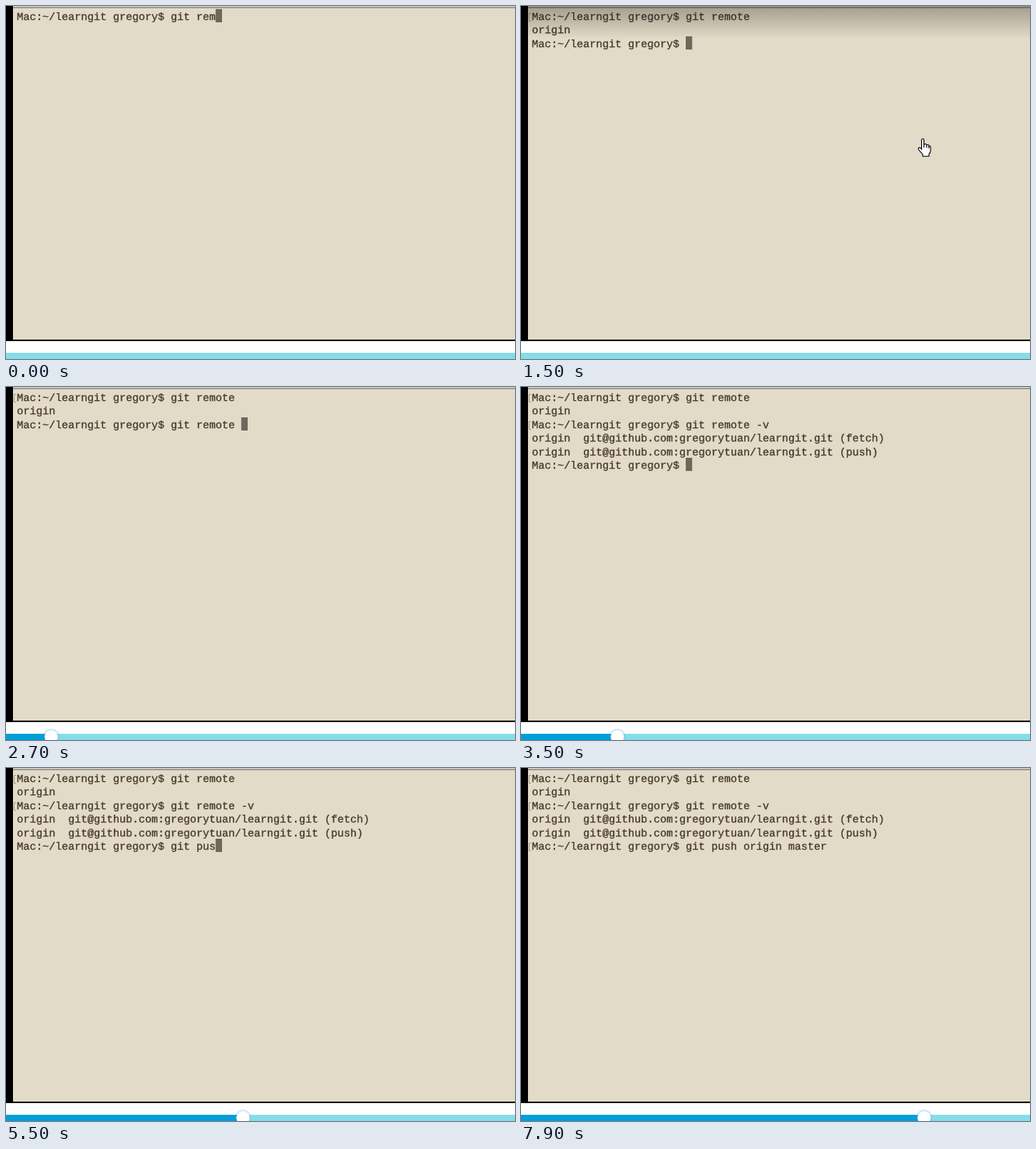
These frames come from a looping animation (655x454 px, 8000 ms). An HTML page with a canvas:

```html
<!DOCTYPE html>
<html lang="en">
<head>
<meta charset="utf-8">
<title>Terminal session</title>
<style>
html, body { margin: 0; width: 100%; height: 100%; overflow: hidden; background: #fff; }
canvas { display: block; }
</style>
</head>
<body>
<canvas id="stage" width="655" height="454"></canvas>
<script>
const ctx = document.getElementById('stage').getContext('2d');
const LOOP = 8000, CELL = 8.25, LINE = 17.4, LEFT = 14, TOP = 4;
const PROMPT = 'Mac:~/learngit gregory$ ';
const REPO = 'git@github.com:gregorytuan/learngit.git';

// pace: [time, characters typed so far], steady typing in between
const session = [
  { text: 'git remote', pace: [[0, 7], [200, 10]], enter: 400, reply: 400,
    output: ['origin'] },
  { text: 'git remote -v', pace: [[1500, 0], [1700, 2], [1900, 3], [2900, 13]],
    enter: 3000, reply: 3100,
    output: [`origin  ${REPO} (fetch)`, `origin  ${REPO} (push)`] },
  { text: 'git push origin master',
    pace: [[4600, 0], [5000, 4], [5200, 4], [5300, 6], [5500, 7], [6000, 12],
           [6600, 16], [6800, 16], [7400, 22]],
    enter: 7800, reply: Infinity, output: [] }
];

const bar = { start: 2117, period: 183.3, step: 16.45, first: 8.9 };

const hand = new Path2D('M5 14V2Q5 .7 6.5 .7T8 2V8Q11 6.5 11.5 8.7Q14 7.8 14.3 10' +
  'Q16.5 9.5 16.5 12V16Q16.5 19 14.5 20.5V23.3H6.5V21L1 14.5Q.3 12.5 2 12Q3.5 12 5 14Z' +
  'M8 8V12M11.5 9V12.5M14.3 10V13');

const clamp = v => Math.max(0, Math.min(1, v));
const rowTop = row => Math.round(TOP + row * LINE);

function typedCount(pace, t) {
  let [from, count] = pace[0];
  for (const [to, next] of pace.slice(1)) {
    count += (next - count) * clamp((t - from) / (to - from));
    if (t < to) break;
    from = to;
  }
  return Math.floor(count + 1e-6);
}

function box(color, x, y, w, h) {
  ctx.fillStyle = color;
  ctx.fillRect(x, y, w, h);
}

function write(text, row) {
  const y = rowTop(row) + 14;
  ctx.fillStyle = ctx.strokeStyle = '#44362c';
  ctx.lineWidth = 0.3;
  ctx.fillText(text, LEFT, y);
  ctx.strokeText(text, LEFT, y);
}

function bracket(row) {
  const y = rowTop(row) + 5.5;
  ctx.strokeStyle = '#a39b8c';
  ctx.lineWidth = 1;
  ctx.beginPath();
  ctx.moveTo(13, y);
  ctx.lineTo(10.5, y);
  ctx.lineTo(10.5, y + 10);
  ctx.lineTo(13, y + 10);
  ctx.stroke();
}

function drawSession(t) {
  ctx.font = '13.75px "Liberation Mono", "Courier New", monospace';
  ctx.textRendering = 'geometricPrecision';
  let row = 0;
  for (const { text, pace, enter, reply, output } of session) {
    const line = PROMPT + text.slice(0, typedCount(pace, t));
    write(line, row);
    if (t >= enter) bracket(row);
    else box('#70675b', LEFT + line.length * CELL, rowTop(row), CELL, 17);
    if (t < reply) break;
    row++;
    for (const reply of output) write(reply, row++);
  }
}

function drawOverlay(t) {
  const alpha = clamp((t - 300) / 400) * clamp((1700 - t) / 400);
  if (!alpha) return;
  const shade = ctx.createLinearGradient(0, 0, 0, 42);
  shade.addColorStop(0, `rgba(30,26,20,${0.65 * alpha})`);
  shade.addColorStop(1, 'rgba(30,26,20,0)');
  box(shade, 9, 0, 646, 42);
  if (t < 500) return;
  ctx.save();
  ctx.translate(510.5, 136 + 34 * clamp((t - 1200) / 300));
  ctx.fillStyle = '#fff';
  ctx.strokeStyle = '#000';
  ctx.lineWidth = 1.1;
  ctx.fill(hand);
  ctx.stroke(hand);
  ctx.restore();
}

function drawProgress(t) {
  box('#86dde8', 0, 446, 655, 8);
  if (t < bar.start) return;
  const x = bar.first + Math.floor((t - bar.start) / bar.period) * bar.step;
  box('#009fda', 0, 446, x, 8);
  ctx.save();
  ctx.shadowColor = '#3ba4dc';
  ctx.shadowBlur = 3;
  ctx.fillStyle = '#fff';
  ctx.beginPath();
  ctx.arc(x, 449.5, 8.6, 0, Math.PI * 2);
  ctx.fill();
  ctx.restore();
}

function draw(t) {
  box('#fff', 0, 0, 655, 454);
  box('#000', 0, 0, 655, 431);
  box('#e2dbc7', 9, 0, 646, 429);
  box('#a09b9b', 9, 1, 646, 2);
  drawSession(t);
  drawOverlay(t);
  drawProgress(t);
}

function frame() {
  draw(Math.floor(performance.now() % LOOP / 100) * 100);
  requestAnimationFrame(frame);
}
frame();
</script>
</body>
</html>
```
